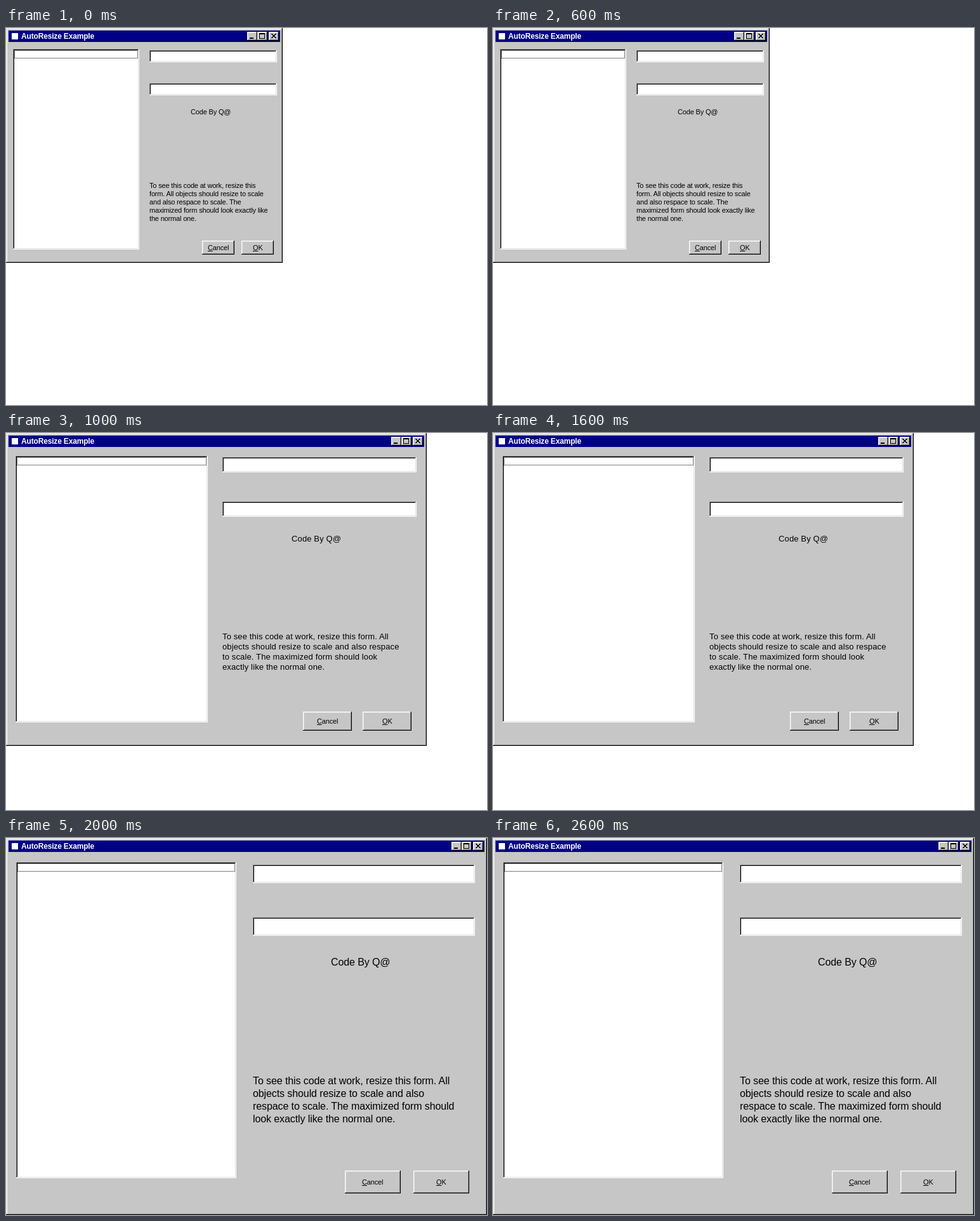
An HTML page that plays this animation: 758x594 px, repeating every 3000 ms.

```html
<!DOCTYPE html>
<html lang="en">
<head>
<meta charset="utf-8">
<title>AutoResize Example</title>
<style>
  :root { --face: #c6c6c6; --light: #dedede; --shade: #848484; }
  html, body { margin: 0; width: 100%; height: 100%; overflow: hidden; background: #fff; }
  div { position: absolute; box-sizing: border-box; }
  .scene { inset: 0; }
  .form { background: var(--face); box-shadow: inset -1px -1px #000, inset 1px 1px var(--light),
    inset -2px -2px var(--shade), inset 2px 2px #fff; }
  .bar { background: #000084; }
  .icon { background: #fff; }
  .field { background: #fff; box-shadow: inset -1px -1px #fff, inset 1px 1px var(--shade),
    inset -2px -2px var(--light), inset 2px 2px #000; }
  .button { background: var(--face); box-shadow: inset -1px -1px #000, inset 1px 1px #fff,
    inset -2px -2px var(--shade), inset 2px 2px var(--light); }
  .focus { border: 1px dotted #000; }
  .text { font-family: "Liberation Sans", Arial, sans-serif; color: #000; white-space: pre; }
  .title { font-weight: bold; color: #fff; }
  u { text-decoration-thickness: 1px; text-underline-offset: 1px; }
  svg { position: absolute; left: 0; top: 0; shape-rendering: crispEdges; }
</style>
</head>
<body>
<script>
const STEP = 1000;
const GLYPHS = {
  min: 'M4 9h6v2h-6z',
  max: 'M3 2h9v9h-9zM4 4v6h7v-6z',
  close: 'M4 3h2v1h1v1h2v-1h1v-1h2v1h-1v1h-1v1h-1v1h1v1h1v1h1v1h-2v-1h-1v-1h-2v1h-1v1h-2v-1h1v-1h1v-1h1v-1h-1v-1h-1v-1h-1z'
};

// Boxes are [left, top, right, bottom]; text is placed by its baseline.
const LAYOUTS = [
  { size: [436, 370], list: [11, 33, 210, 349],
    fields: [[226, 35, 427, 54], [226, 87, 427, 106]],
    font: [11, 13, -0.17], credit: [291, 136], note: [226, 252],
    lines: ['To see this code at work, resize this', 'form. All objects should resize to scale',
      'and also respace to scale. The', 'maximized form should look exactly like', 'the normal one.'],
    cancel: [309, 335, 360, 357], ok: [371, 335, 422, 357], labels: [318, 389, 350] },
  { size: [663, 493], list: [15, 36, 318, 456],
    fields: [[341, 38, 647, 62], [341, 108, 647, 132]],
    font: [13, 16, 0.13], credit: [450, 172], note: [341, 326],
    lines: ['To see this code at work, resize this form. All', 'objects should resize to scale and also respace',
      'to scale. The maximized form should look', 'exactly like the normal one.'],
    cancel: [468, 439, 545, 469], ok: [562, 439, 639, 469], labels: [490, 593, 458] },
  { size: [758, 594], list: [16, 38, 363, 536],
    fields: [[389, 42, 739, 71], [389, 125, 739, 154]],
    font: [16, 20, -0.1], credit: [512, 202], note: [389, 389],
    lines: ['To see this code at work, resize this form. All', 'objects should resize to scale and also',
      'respace to scale. The maximized form should', 'look exactly like the normal one.'],
    cancel: [534, 524, 622, 560], ok: [642, 524, 730, 560], labels: [561, 678, 546] }
];

function add(parent, cls, style = {}) {
  const el = document.createElement('div');
  el.className = cls;
  Object.assign(el.style, style);
  return parent.appendChild(el);
}

function box(parent, cls, [l, t, r, b]) {
  return add(parent, cls, { left: l + 'px', top: t + 'px', width: r - l + 'px', height: b - t + 'px' });
}

function text(parent, html, x, baseline, [size, pitch, spacing], cls = '') {
  const top = Math.round(baseline - pitch / 2 - 0.3465 * size);
  add(parent, 'text ' + cls, {
    left: x + 'px', top: top + 'px', fontSize: size + 'px',
    lineHeight: pitch + 'px', letterSpacing: spacing + 'px'
  }).innerHTML = html;
}

function control(parent, x, glyph) {
  box(parent, 'button', [x, 6, x + 16, 20]).innerHTML =
    `<svg width="16" height="14"><path fill-rule="evenodd" d="${GLYPHS[glyph]}"/></svg>`;
}

function build(o) {
  const scene = add(document.body, 'scene');
  const [w, h] = o.size;
  const small = [11, 13, -0.17];
  box(scene, 'form', [0, 0, w, h]);
  box(scene, 'bar', [4, 4, w - 4, 22]);
  box(scene, 'icon', [9, 8, 19, 18]);
  text(scene, 'AutoResize Example', 24, 17, [12, 14, -0.17], 'title');
  control(scene, w - 56, 'min');
  control(scene, w - 40, 'max');
  control(scene, w - 22, 'close');

  const [l, t, r] = o.list;
  box(scene, 'field', o.list);
  box(scene, 'focus', [l + 2, t + 2, r - 2, t + 15]);
  o.fields.forEach(f => box(scene, 'field', f));
  text(scene, 'Code By Q@', ...o.credit, o.font);
  text(scene, o.lines.join('\n'), ...o.note, o.font);

  const [cancelX, okX, base] = o.labels;
  box(scene, 'button', o.cancel);
  box(scene, 'button', o.ok);
  text(scene, '<u>C</u>ancel', cancelX, base, small);
  text(scene, '<u>O</u>K', okX, base, small);
  return scene;
}

const count = LAYOUTS.length;
LAYOUTS.map(build).forEach((scene, i) => {
  const steps = Array.from({ length: count + 1 }, (_, k) =>
    ({ opacity: k % count === i ? 1 : 0, offset: k / count, easing: 'step-end' }));
  scene.animate(steps, { duration: STEP * count, iterations: Infinity });
});
</script>
</body>
</html>
```
